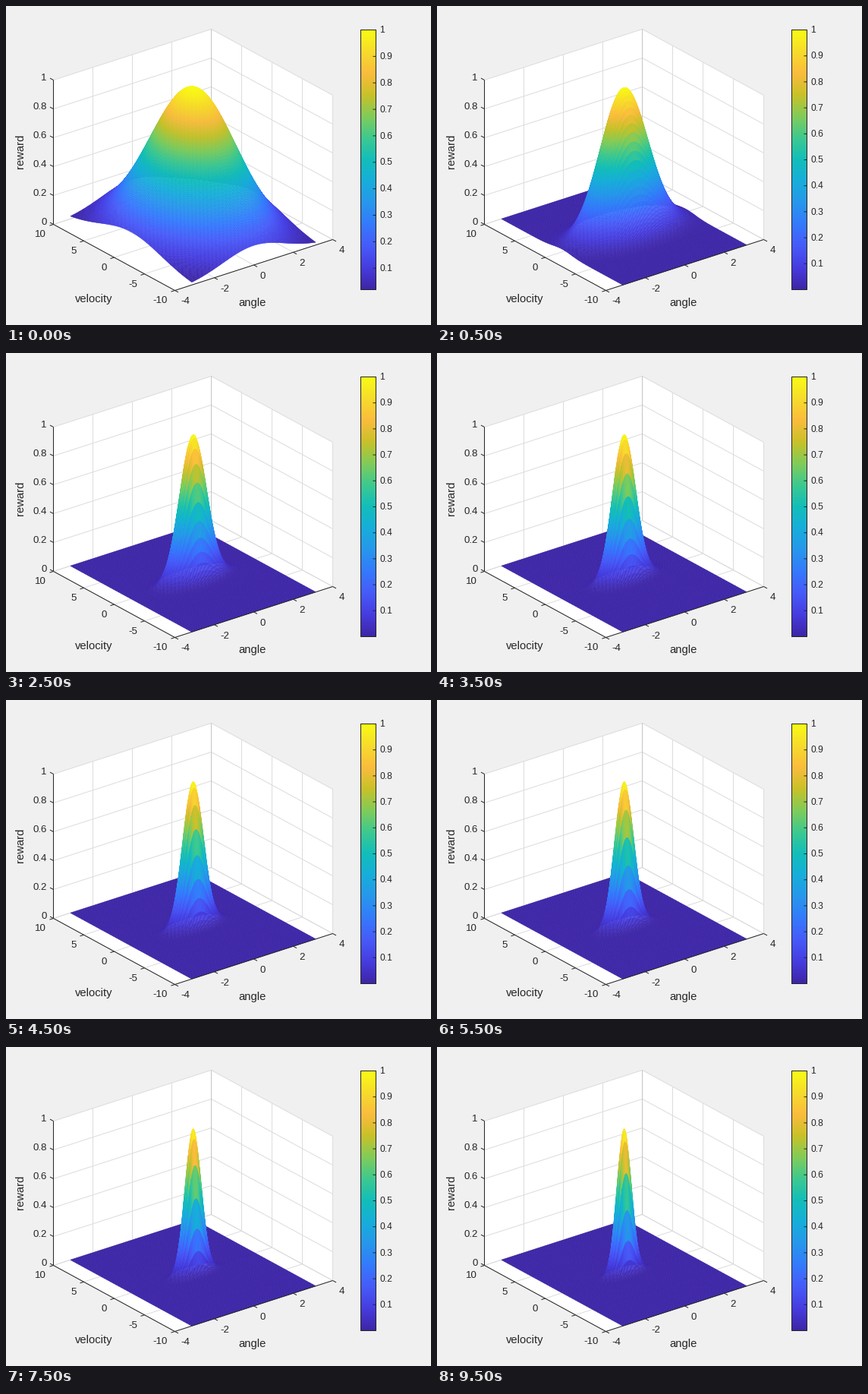
Recreate the animation shown at these times as a matplotlib script. Size 560x420 px, loop 10 s.

```python
import numpy as np
import matplotlib.pyplot as plt
from matplotlib.animation import FuncAnimation
from matplotlib.colors import LinearSegmentedColormap

W, H, DPI = 560, 420, 100
FRAMES, INTERVAL = 20, 500
INK = "#262626"
PX = 72 / DPI  # one pixel in points

HEAT = LinearSegmentedColormap.from_list("heat", (
    "#3e26a8 #463de0 #475bf9 #347afd #2797eb #17aeda #12beb9 "
    "#3dc990 #81cc59 #c8c129 #fbbc3d #f7db2b #f9fb15").split())


def project(angle, velocity, z=0):
    a = (angle + 4) / 8
    v = (10 - velocity) / 20
    return 62 + 208 * a + 160 * v, 287 - 67 * a + 87 * v - 190 * z


def line(xs, ys, color=INK, zorder=4):
    return ax.plot(xs, ys, color=color, lw=PX, zorder=zorder,
                   snap=False, solid_capstyle="butt")[0]


def path(*points, **style):
    return line(*zip(*(project(*p) for p in points)), **style)


def tick(point, dx, dy):
    x, y = project(*point)
    line([x, x + dx], [y, y + dy])
    return x, y


def label(x, y, text, size=13.3, **kw):
    kw.setdefault("va", "baseline")
    return ax.text(x, y, text, fontsize=size * PX, color=INK,
                   family="Liberation Sans", zorder=5, **kw)


fig = plt.figure(figsize=(W / DPI, H / DPI), dpi=DPI, facecolor="#f0f0f0")
ax = fig.add_axes([0, 0, 1, 1])
ax.axis("off")

# Walls and floor
outline = [(-4, 10, 1), (4, 10, 1), (4, -10, 1), (4, -10, 0), (-4, -10, 0), (-4, 10, 0)]
ax.fill(*zip(*(project(*p) for p in outline)), color="white", lw=0, zorder=0)

grid = dict(color="#dcdcdc", zorder=1)
for a in range(-4, 5, 2):
    path((a, -10, 0), (a, 10, 0), (a, 10, 1), **grid)
for v in range(-10, 11, 5):
    path((-4, v, 0), (4, v, 0), (4, v, 1), **grid)
for z in np.linspace(0, 1, 6):
    path((-4, 10, z), (4, 10, z), (4, -10, z), **grid)
path((4, 10, 0), (4, 10, 1), color="#c4c4c4", zorder=1)

# Axes, ticks and labels
path((-4, 10, 1), (-4, 10, 0), (-4, -10, 0), (4, -10, 0))
for z in np.linspace(0, 1, 6):
    x, y = tick((-4, 10, z), -4.5, -2.4)
    label(x - 9, y + 0.5, f"{z:.1g}", ha="right")
for v in range(-10, 11, 5):
    x, y = tick((-4, v), -5, 1.6)
    label(x - 9.5, y + 17, str(v), ha="right")
for a in range(-4, 5, 2):
    x, y = tick((a, -10), 4.5, 2.4)
    label(x + 8, y + 18, str(a), ha="left")
label(115.5, 389.5, "velocity", 14.7, ha="center")
label(324.5, 394.5, "angle", 14.7, ha="center")
label(18.5, 191, "reward", 14.7, ha="center", va="center", rotation=90)

# Colour bar
LEFT, RIGHT, TOP, BOTTOM = 467, 487, 31, 373
ax.imshow(np.linspace(1, 0, 256)[:, None], cmap=HEAT, aspect="auto",
          extent=(LEFT, RIGHT, BOTTOM, TOP), zorder=2)
line([LEFT, RIGHT, RIGHT, LEFT, LEFT], [TOP, TOP, BOTTOM, BOTTOM, TOP])
levels = np.arange(1, 11) / 10
bar_ticks = [line([], []) for _ in levels]
bar_labels = [label(492, 0, f"{t:g}", 12, ha="left") for t in levels]

# Whole coordinates fall on pixel centres
ax.set_xlim(-0.5, W - 0.5)
ax.set_ylim(H - 0.5, -0.5)
ax.autoscale(False)

# Far cells come first so that near ones cover them
angle, velocity = np.meshgrid(np.linspace(np.pi, -np.pi, 131), np.linspace(10, -10, 131))
surface = None


def draw(n):
    global surface
    gain = 0.2 * n
    z = np.exp(-(0.2 + gain) * angle**2 - (0.02 + gain) * velocity**2)
    low = z.min()
    cell = (z[:-1, :-1] + z[1:, :-1] + z[:-1, 1:] + z[1:, 1:]) / 4
    if surface is not None:
        surface.remove()
    surface = ax.pcolormesh(*project(angle, velocity, z), cell, cmap=HEAT,
                            vmin=low, vmax=1, edgecolors="face", snap=False,
                            linewidth=0.4 * PX, antialiased=True, zorder=3)
    for t, mark, text in zip(levels, bar_ticks, bar_labels):
        y = BOTTOM - (t - low) / (1 - low) * (BOTTOM - TOP)
        mark.set_data([RIGHT - 4, RIGHT], [y, y])
        text.set_y(y + 3.7)
    return [surface, *bar_ticks, *bar_labels]


anim = FuncAnimation(fig, draw, frames=FRAMES, interval=INTERVAL,
                     init_func=lambda: [], repeat=True, repeat_delay=0)
plt.show()
```
